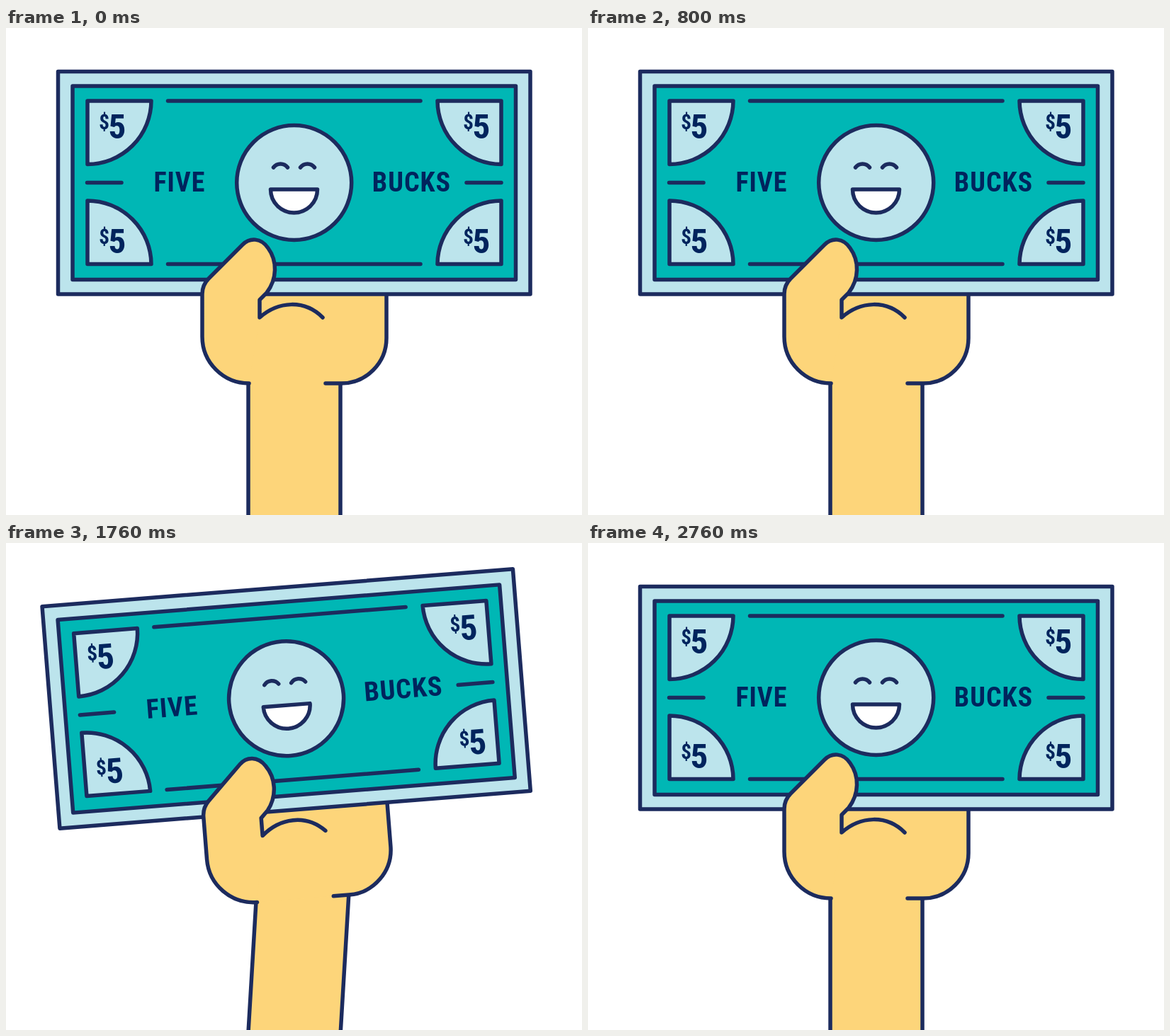
These frames come from a looping animation (813 px wide and 688 px high, 4.76 s). An HTML page:

```html
<!DOCTYPE html>
<html lang="en">
<head>
<meta charset="utf-8">
<title>Five bucks</title>
<style>
  html, body { margin: 0; width: 100%; height: 100%; overflow: hidden; background: #fff; }
  svg { display: block; width: 100%; height: 100%; }
  .line { fill: none; stroke: #1c2b5e; stroke-width: 5.5; stroke-linecap: round; stroke-linejoin: round; }
  .pale { fill: #bce4ec; }
  .teal { fill: #00b7b5; }
  .skin { fill: #fdd57a; }
  .white { fill: #fff; }
  text {
    fill: #00245d; font-family: "Roboto Condensed", Roboto, sans-serif;
    font-weight: 700; font-stretch: 75%; text-anchor: middle;
  }
  .word { font-size: 38px; letter-spacing: 1px; }
  .sign { font-size: 29px; }
  .digit { font-size: 49px; }
</style>
</head>
<body>
<svg viewBox="0 0 813 688">
  <defs>
    <path id="corner" class="line pale" d="M115 103H205A90 90 0 0 1 115 192.500Z"/>
    <g id="value">
      <text class="sign" x="138.500" y="143">$</text>
      <text class="digit" x="157" y="156">5</text>
    </g>
  </defs>

  <g id="arm">
    <path class="skin" d="M342 470H472V780H342Z"/>
    <path class="line" d="M342 485V780M472 485V780"/>
  </g>

  <g id="hand">
    <path class="skin" d="M277 365V436A66 66 0 0 0 343 502H473A64 64 0 0 0 537 438V365Z"/>
    <path class="line" d="M451 502H473A64 64 0 0 0 537 438V365"/>

    <g id="bill">
      <rect class="line pale" x="73.500" y="61.500" width="666.500" height="314.500"/>
      <rect class="line teal" x="94" y="82" width="625.500" height="273.500"/>
      <use href="#corner"/>
      <use href="#corner" transform="matrix(-1 0 0 1 814 0)"/>
      <use href="#corner" transform="matrix(1 0 0 -1 0 436.500)"/>
      <use href="#corner" transform="matrix(-1 0 0 -1 814 436.500)"/>
      <use href="#value"/>
      <use href="#value" x="514"/>
      <use href="#value" y="162"/>
      <use href="#value" x="514" y="162"/>
      <path class="line" d="M228.500 103H585M228.500 333.500H585M114.500 218.500H163M650 218.500H699"/>
      <text class="word" x="245" y="231">FIVE</text>
      <text class="word" x="572.500" y="231">BUCKS</text>
      <circle class="line pale" cx="406.700" cy="218.500" r="81"/>
      <path class="line" d="M377.500 197A12.500 12.500 0 0 1 397.500 197M415.500 197A12.500 12.500 0 0 1 435.500 197"/>
      <path class="line white" d="M373.500 228H439.500A33 33 0 0 1 373.500 228Z"/>
    </g>

    <path class="line skin" d="M343 502A66 66 0 0 1 277 436V376Q277 363 286 354L334 306C344 296 360 296 370 311C383 329 383 354 368 374L358 384V409L343 502" style="stroke:none"/>
    <path class="line" d="M343 502A66 66 0 0 1 277 436V376Q277 363 286 354L334 306C344 296 360 296 370 311C383 329 383 354 368 374L358 384V409C384 386 421 383 447 409"/>
  </g>
</svg>
<script>
  const LOOP = 4760, STEP = 80, MID = 407;
  const ELBOW = 693, WRIST = 502, GRIP = 378;
  const [arm, hand, bill] = ['arm', 'hand', 'bill'].map(id => document.getElementById(id));

  // [time, swing]: -1 is full left, 1 full right
  const swingKeys = [[0, 0], [400, -1], [1200, 1], [2000, -1], [2400, 0]];
  const ease = u => u * u * (3 - 2 * u);

  function swingAt(t) {
    for (let i = 1; i < swingKeys.length; i++) {
      const [t0, a] = swingKeys[i - 1], [t1, b] = swingKeys[i];
      if (t < t1) return a + (b - a) * ease((t - t0) / (t1 - t0));
    }
    return 0;
  }

  function popAt(t) {
    if (t < 2600 || t >= 2760) return 1;
    return t < 2680 ? 1.05 : 1.03;
  }

  function draw(t) {
    const swing = swingAt(Math.floor(t / STEP) * STEP);
    const lean = `rotate(${-6 * swing} ${MID} ${ELBOW})`;
    arm.setAttribute('transform', lean);
    hand.setAttribute('transform', `${lean} rotate(${14 * swing} ${MID} ${WRIST})`);
    bill.setAttribute('transform',
      `translate(${MID} ${GRIP}) scale(${popAt(t)}) translate(${-MID} ${-GRIP})`);
  }

  function tick() {
    draw(performance.now() % LOOP);
    requestAnimationFrame(tick);
  }
  tick();
</script>
</body>
</html>
```
